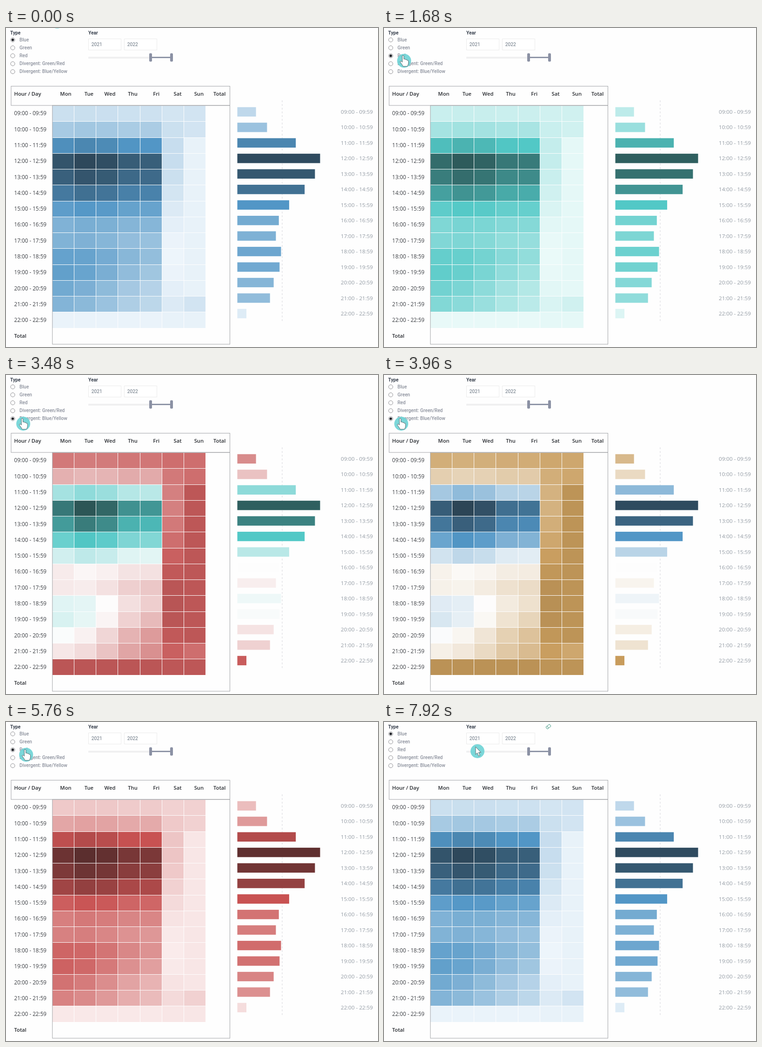
Write an HTML page that moves like this. It is 800 by 688 pixels and loops after 8 s.

```html
<!DOCTYPE html>
<html lang="en">
<head>
<meta charset="utf-8">
<title>Hour by day heatmap</title>
<style>
  html, body { margin: 0; height: 100%; overflow: hidden; background: #fefefe; }
  svg { display: block; width: 100vw; height: 100vh; }
  .grid { font: 11.7px "Open Sans", "Noto Sans", sans-serif; fill: #3b3e43; }
  .head { font: 600 11.2px "Open Sans", "Noto Sans", sans-serif; fill: #26292e; }
  .axis { font: 11.6px "Open Sans", "Noto Sans", sans-serif; fill: #929aa3; }
  .form { font: 500 10.2px Roboto, sans-serif; fill: #8b909c; }
  .input { font: 10.2px Roboto, sans-serif; fill: #66727f; }
  .title { font: 700 10.2px Roboto, sans-serif; fill: #3b4350; }
</style>
</head>
<body>
<svg id="stage" viewBox="0 0 800 688"></svg>
<script>
const LOOP = 8000, STEP = 120;
const stage = document.getElementById('stage');

function add(name, attrs, parent = stage) {
  const node = document.createElementNS('http://www.w3.org/2000/svg', name);
  for (const key in attrs) node.setAttribute(key, attrs[key]);
  return parent.appendChild(node);
}
const box = (x, y, width, height, attrs) => add('rect', { x, y, width, height, ...attrs });
function label(x, y, content, style, anchor = 'start') {
  add('text', { x, y, class: style, 'text-anchor': anchor }).textContent = content;
}

// Colour scales: [level, [r, g, b]] stops; levels are percent of the busiest hour.
const DARK_BLUE = [47, 75, 95], BLUE = [82, 150, 198];
const DARK_GREEN = [47, 95, 95], GREEN = [82, 200, 198];
const sequential = (pale, mid, dark) => [[-9, pale], [58, mid], [100, dark]];
const divergent = (low, high, highest) =>
  [[-9, low.map(c => c * .88)], [0, low], [44, [253, 253, 253]], [79, high], [100, highest]];
const scales = [
  sequential([244, 249, 253], BLUE, DARK_BLUE),
  sequential([241, 252, 251], GREEN, DARK_GREEN),
  sequential([252, 242, 242], [200, 82, 82], [95, 47, 47]),
  divergent([200, 92, 92], GREEN, DARK_GREEN),
  divergent([200, 156, 92], BLUE, DARK_BLUE)
];
function colour(scale, level) {
  let i = 1;
  while (i < scale.length - 1 && level > scale[i][0]) i++;
  const [a, from] = scale[i - 1], [b, to] = scale[i];
  const k = (level - a) / (b - a);
  return `rgb(${from.map((c, n) => Math.round(c + (to[n] - c) * k))})`;
}

// Average level of each hour from 09:00
const FIRST_HOUR = 9;
const averages = [13, 28, 67, 100, 93, 79, 58, 44, 40, 47, 45, 37, 32, 0];
const days = ['Mon', 'Tue', 'Wed', 'Thu', 'Fri', 'Sat', 'Sun'];

// Weekdays follow the average, with evenings fading through the week; weekends stay quiet.
function dayLevel(hour, day, average) {
  const quiet = average - 4;
  if (day === 6) return Math.min(quiet, hour < 11 || hour > 20 ? 5 : -4);
  if (day === 5) return Math.min(quiet, 2 + 8 * Math.cos((hour - 11.5) * Math.PI / 6.5));
  const evening = Math.max(0, Math.min(1, (hour - 16) / 4));
  const midday = 7 * Math.sin(day * Math.PI / 2.4);
  return quiet - 1 + average / 100 * (midday + evening * (2 - day) * 17);
}

// Type and year filters
const optionY = i => 25.6 + 17.15 * i;
label(9, 13.5, 'Type', 'title');
const dots = ['Blue', 'Green', 'Red', 'Divergent: Green/Red', 'Divergent: Blue/Yellow'].map((name, i) => {
  const cy = optionY(i);
  add('circle', { cx: 14.5, cy, r: 4.5, fill: '#fff', stroke: '#8c8c90' });
  label(29, cy + 3.2, name, 'form');
  return add('circle', { cx: 14.5, cy, r: 2.8, fill: '#24262c' });
});
label(177, 13.5, 'Year', 'title');
[2021, 2022].forEach((year, i) => {
  const x = 177.5 + 77 * i;
  box(x, 23.5, 70, 24, { fill: '#fff', stroke: '#ebebeb' });
  label(x + 6.3, 39, year, 'input');
});
box(177, 62, 134, 4, { fill: '#f0f0f1' });
box(311, 62, 45, 3, { fill: '#8f95a7' });
[308, 353].forEach(x => box(x, 54.5, 6, 18, { rx: 2, fill: '#8b91a4' }));
const eraser = add('g', { fill: 'none', stroke: '#5aa594', transform: 'translate(353.5 10) rotate(-40)' });
add('rect', { x: -5, y: -2.8, width: 10, height: 5.6, rx: 1 }, eraser);
add('path', { d: 'M-1.5 -2.8V2.8' }, eraser);

// Heatmap and bars
add('path', { d: 'M594 156V636', stroke: '#e9e9ec', 'stroke-width': 2, 'stroke-dasharray': '4 4' });
const cells = [], bars = [];
const columnX = d => Math.round(99.1 + 47.1 * d);
const rowY = i => Math.round(167 + 34.25 * i);
averages.forEach((average, i) => {
  const hour = FIRST_HOUR + i, barY = 170.7 + 33.47 * i;
  const hh = String(hour).padStart(2, '0'), range = `${hh}:00 - ${hh}:59`;
  label(17.5, 188.3 + 34.3 * i, range, 'grid');
  label(789, barY + 14.2, range, 'axis', 'end');
  days.forEach((_, d) => {
    const x = columnX(d) + 1, y = rowY(i) + 1;
    cells.push({ level: dayLevel(hour, d, average), node: box(x, y, columnX(d + 1) - x, rowY(i + 1) - y) });
  });
  bars.push({ level: average, node: box(497.5, barY, 19.5 + 1.585 * average, 20.3) });
});
label(17.5, 668.3, 'Total', 'head');
const frameStyle = { fill: 'none', stroke: '#a2a4a8' };
box(11, 125.5, 470.5, 41.5, frameStyle);
box(99.8, 167, 381.7, 515, frameStyle);
label(17.5, 146.3, 'Hour / Day', 'head');
[...days, 'Total'].forEach((day, i) => label(140.6 + 47.4 * i, 146.3, day, 'head', 'end'));

// Pointer
const pointer = add('g', {});
add('circle', { r: 15, fill: '#6dd3d5', 'fill-opacity': .9 }, pointer);
const ink = { fill: '#fff', stroke: '#59686d', 'stroke-linejoin': 'round' };
const hand = add('path', { ...ink,
  d: 'M-4 3V-9.5Q-4 -11.5 -2.3 -11.5T-.6 -9.5V-3.5Q2.5 -5 3 -2.5Q6 -3.5 6.3 -1Q9.3 -1.5 9.3 1V5Q9 8 7 12H-2.5Q-4 8 -8 3.5Q-9.3 1 -7 .8Q-5.5 1 -4 3Z' }, pointer);
const arrow = add('path', { ...ink, d: 'M-4 -9.5V7L-.3 3.6L2.5 10.5L5.4 9.2L2.5 2.6H7.5Z' }, pointer);

// Each visit: option, click time, wait until the bars redraw. The heatmap follows one step later.
const visits = [
  [1, 720, 120], [2, 1680, 120], [3, 2640, 120], [4, 3240, 600],
  [3, 4560, 120], [2, 5400, 240], [1, 6120, 360], [0, 7200, 120]
].map(([option, click, wait]) => ({ option, click, bars: click + wait, cells: click + wait + STEP }));

// The pointer leaves for the next option once the heatmap is done, and enters and exits elsewhere.
const overOption = i => ({ x: 49.5 - 3.1 * i, y: optionY(i) + 10.8 });
const moves = [];
let place = { x: 110, y: -14 }, free = 0;
for (const { option, click, cells } of visits) {
  const next = overOption(option);
  moves.push({ from: place, to: next, start: Math.max(free, click - 480), end: click });
  place = next;
  free = cells;
}
moves.push({ from: place, to: { x: 201, y: 63 }, start: 7680, end: 7920 });

function pointerAt(t) {
  const { from, to, start, end } = moves.filter(move => move.start <= t).pop() || moves[0];
  const k = Math.max(0, Math.min(1, (t - start) / (end - start))), ease = k * k * (3 - 2 * k);
  return { x: from.x + (to.x - from.x) * ease, y: from.y + (to.y - from.y) * ease };
}

const current = (t, phase) => visits.filter(visit => visit[phase] <= t).pop()?.option ?? 0;
const paint = (items, scale) =>
  items.forEach(({ node, level }) => node.setAttribute('fill', colour(scales[scale], level)));
const show = (node, visible) => node.setAttribute('visibility', visible ? 'visible' : 'hidden');

function draw(t) {
  const selected = current(t, 'click');
  dots.forEach((dot, i) => show(dot, i === selected));
  paint(bars, current(t, 'bars'));
  paint(cells, current(t, 'cells'));
  const { x, y } = pointerAt(t);
  const overType = x < 100 && y > 15;
  pointer.setAttribute('transform', `translate(${x} ${y})`);
  show(hand, overType);
  show(arrow, !overType);
  show(eraser, x > 165);
}

const start = performance.now();
function tick() {
  const elapsed = (performance.now() - start) % LOOP;
  draw(Math.floor(elapsed / STEP) * STEP);
  requestAnimationFrame(tick);
}
tick();
</script>
</body>
</html>
```
